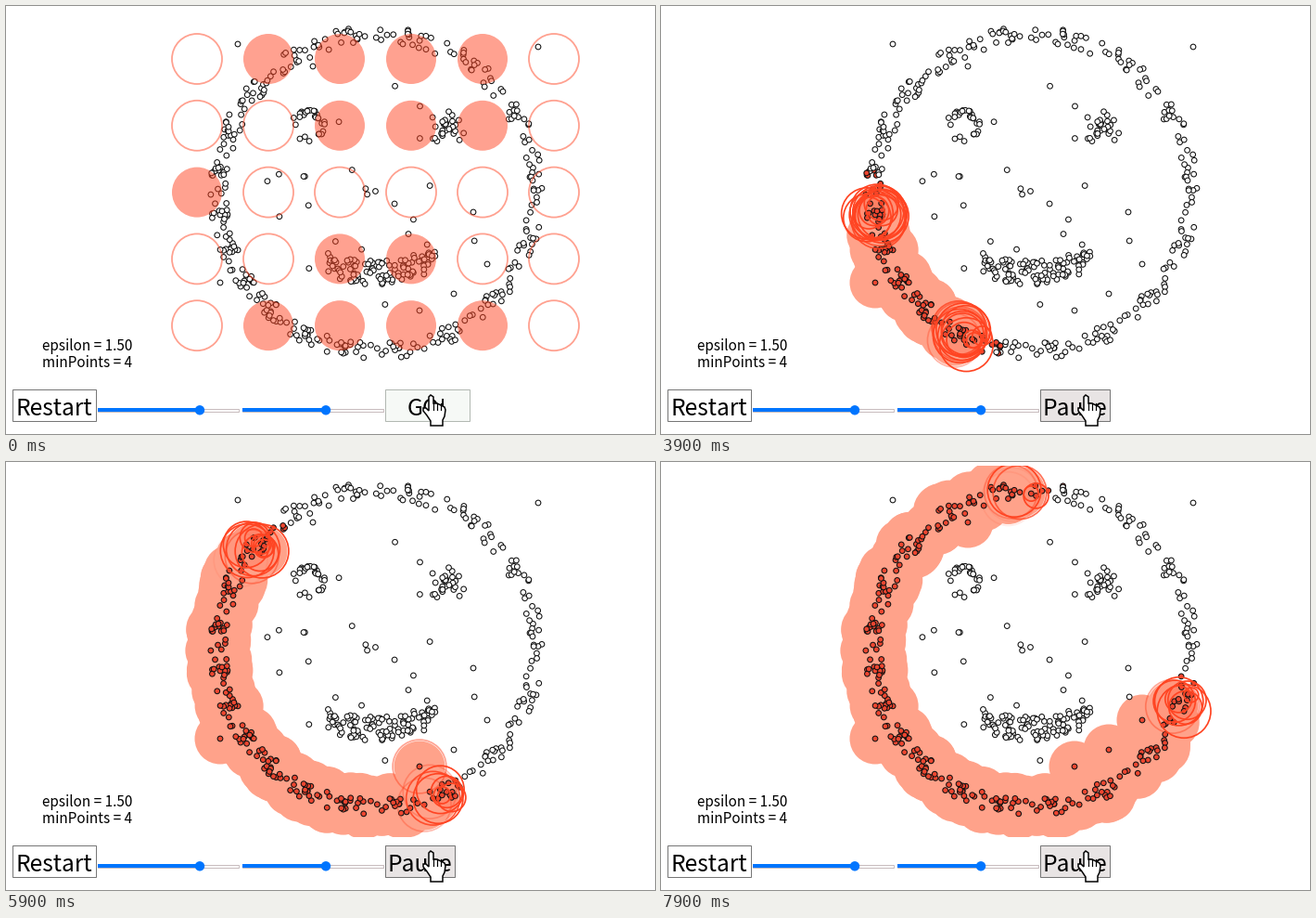
Write a matplotlib script that moves like this. It is 700x461 px and loops after 8000 ms.

```python
import numpy as np
import matplotlib.pyplot as plt
from matplotlib.animation import FuncAnimation
from matplotlib.colors import to_rgba
from matplotlib.patches import Circle, Polygon, Rectangle

W, H, DPI = 700, 461, 100
PT = 72 / DPI                      # points per pixel
FRAMES, START = 80, 25
EPS = 27.5
CENTER, FACE_RADIUS = np.array([400, 201]), 171
SEED_ANGLE, SPEED = 143.7, 2.35    # degrees, degrees per frame
LOOK_AHEAD, RING_LIFE = 4, 4       # frames
SALMON, RED, DOT_RED = "#ffa28a", "#ff4422", "#ee4630"
BLUE, BORDER = "#0075ff", "#767676"
GRID = ("011110", "001110", "100000", "001100", "011110")

rng = np.random.default_rng(12)


def polar(center, radius, angle):
    return np.column_stack([center[0] + radius * np.cos(angle),
                            center[1] + radius * np.sin(angle)])


def outline(n=350):
    """Rough circle, densest at the lower left and slightly clumped."""
    turn = np.linspace(0, 2 * np.pi, n, endpoint=False)
    angle = turn + 0.3 * np.sin(turn + 0.44) + 0.035 * np.sin(19 * turn)
    angle += rng.normal(0, 0.02, n)
    return polar(CENTER, FACE_RADIUS + rng.uniform(-9, 9, n), angle)


def mouth(n=96):
    x = rng.uniform(347, 464, n)
    y = 287 - 12 * ((x - 398) / 60) ** 2 + rng.uniform(-13, 13, n)
    return np.column_stack([x, y])


def eye(center, inner, outer, n=28):
    return polar(center, rng.uniform(inner, outer, n), rng.uniform(0, 2 * np.pi, n))


def strays(n=28):
    inside = polar(CENTER, 122 * np.sqrt(rng.random(n)), rng.uniform(0, 2 * np.pi, n))
    outliers = [(250, 41), (574, 44), (231, 298), (331, 65),
                (446, 328), (483, 310), (519, 278)]
    return np.vstack([inside, outliers])


def visit_frames(points):
    """Frame at which the spreading cluster reaches each point, inf if never."""
    dx, dy = (points - CENTER).T
    dist = np.hypot(dx, dy)
    angle = np.degrees(np.arctan2(dy, dx))
    travel = np.abs((angle - SEED_ANGLE + 180) % 360 - 180)
    when = START + travel / SPEED + rng.uniform(-1, 1, len(points))
    return np.where((dist > 130) & (dist < 200), np.maximum(when, START), np.inf)


points = np.vstack([outline(), mouth(), eye((326, 129), 12, 18),
                    eye((474, 131), 3, 21), strays()])
visited = visit_frames(points)

fig = plt.figure(figsize=(W / DPI, H / DPI), dpi=DPI, facecolor="white")
ax = fig.add_axes([0, 0, 1, 1])
ax.set(xlim=(0, W), ylim=(H, 0))
ax.axis("off")


def label(x, y, text, px, ha="left"):
    return ax.text(x, y, text, fontsize=px * PT, ha=ha, va="baseline",
                   family="Noto Sans CJK JP", color="black", zorder=11)


def button(x, width):
    return ax.add_patch(Rectangle((x, 413), width, 34, fc="white", ec=BORDER,
                                  lw=PT, zorder=10))


def slider(x0, x1, thumb):
    ax.add_patch(Rectangle((x0, 433.5), x1 - x0, 3.5, fc="white", ec="#c8bcbe", lw=PT))
    ax.add_patch(Rectangle((x0, 433.3), thumb - x0, 4, fc=BLUE, ec="none"))
    ax.add_patch(Circle((thumb, 435.3), 5.2, fc=BLUE, ec="none"))


def cursor():
    hand = [(456, 421), (458, 419), (461, 421), (461, 428), (465, 428), (469, 430),
            (473, 432), (474, 435), (473, 442), (471, 446), (471, 452), (458, 452),
            (458, 447), (454, 441), (450, 436), (450, 433), (453, 433), (456, 436)]
    ax.add_patch(Polygon(hand, fc="white", ec="black", lw=1.5 * PT, zorder=12))
    for x in (461, 465, 469):
        ax.plot([x, x], [428, 435], color="black", lw=1.2 * PT, zorder=13)


def dots(zorder, clip=None, **style):
    layer = ax.scatter([], [], zorder=zorder, **style)
    if clip is not None:
        layer.set_clip_path(clip)
    return layer


def place(layer, where, radius):
    layer.set_offsets(where)
    layer.set_sizes((2 * PT * np.broadcast_to(radius, len(where))) ** 2)


def make_grid():
    cells = []
    for row, pattern in enumerate(GRID):
        for col, mark in enumerate(pattern):
            fill = RED if mark == "1" else "none"
            cells.append(ax.add_patch(Circle(
                (206 + 77 * col, 57 + 71.8 * row), EPS - 0.5, fc=fill, ec=RED,
                alpha=0.5, lw=0 if mark == "1" else 1.8 * PT, zorder=6)))
    return cells


stage = Rectangle((0, 4), W, 399.5, transform=ax.transData)
discs = dots(2, stage, c=SALMON, linewidths=0)
glow = dots(3, stage, c=RED, alpha=0.1, linewidths=0)
markers = dots(4, c="white", edgecolors="#111111", linewidths=1.05 * PT)
rings = dots(5, stage, facecolors="none", edgecolors=RED, linewidths=1.7 * PT)
place(markers, points, 2.85)
grid = make_grid()

button(7, 90)
label(52, 440.5, "Restart", 24.6, "center")
label(39, 371, "epsilon = 1.50", 15.3)
label(39, 389, "minPoints = 4", 15.3)
slider(99, 251, 209)
slider(255, 407, 345)
action = button(408.5, 90)
action_text = label(454, 440.5, "GO!", 24.6, "center")
cursor()


def update_button(running, hovered):
    action.set_width(75 if running else 91)
    action.set_facecolor("#e8e4e4" if hovered else "#f6f9f6")
    action.set_edgecolor(BORDER if hovered else "#b2b8b2")
    action_text.set_text("Pause" if running else "GO!")
    action_text.set_x(446 if running else 454)


def update(frame):
    running = frame >= START
    update_button(running, running or 10 <= frame < 15)
    for cell in grid:
        cell.set_visible(not running)

    age = frame - visited
    reached = running & (age >= -LOOK_AHEAD)
    markers.set_facecolors(np.where(reached[:, None], to_rgba(DOT_RED), to_rgba("white")))
    place(discs, points[age >= 2], EPS)

    live = (age >= 0) & (age < RING_LIFE)
    radius = EPS * np.minimum(0.25 + 0.45 * age[live], 1.05)
    colors = np.tile(to_rgba(RED), (live.sum(), 1))
    colors[:, 3] = np.clip((RING_LIFE - age[live]) / 1.6, 0, 1)
    place(rings, points[live], radius)
    rings.set_edgecolors(colors)
    place(glow, points[live], np.where(age[live] < 1.5, radius, 0))
    return []


anim = FuncAnimation(fig, update, frames=FRAMES, interval=100, repeat=True,
                     repeat_delay=0, blit=False)
plt.show()
```
